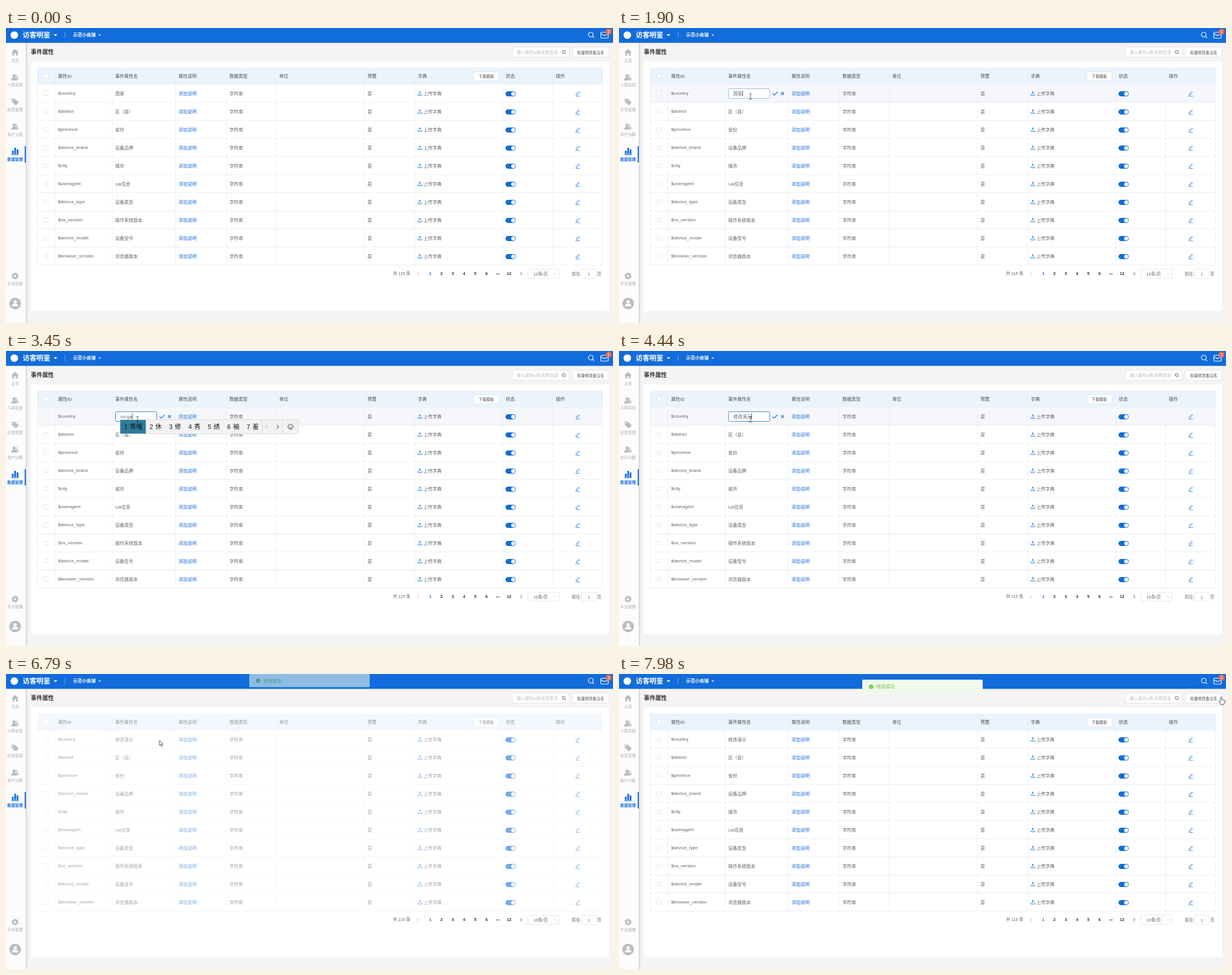
Write an HTML page that moves like this. It is 1073x522 px and loops after 8000 ms.

```html
<!DOCTYPE html>
<html lang="zh-CN">
<head>
<meta charset="utf-8">
<title>事件属性</title>
<style>
html, body { margin: 0; width: 100%; height: 100%; overflow: hidden; background: #f4f4f5; }
svg { display: block; width: 1073px; height: 522px; fill: #606266; cursor: default;
  font: 8px "Liberation Sans", "Noto Sans CJK SC", "Noto Sans CJK", sans-serif; }
.line { fill: none; stroke: currentColor; }
.box { fill: #fff; stroke: #dcdfe6; stroke-width: .8; }
.blue { color: #126cdb; }
.side { filter: drop-shadow(0 0 2px #0005); }
.mid { text-anchor: middle; }
#cursor, #toast, #mask, #field { animation: 8s linear infinite; }
#cursor { animation-name: travel; }
#toast { animation-name: drop; }
#mask { animation-name: refresh; }
#field { animation-name: focus; }

@keyframes travel {
  0%, 1.75% { transform: translate(1008px, 530px); animation-timing-function: ease-in-out; }
  9.5% { transform: translate(1012px, 124px); animation-timing-function: ease-out; }
  11.625%, 12% { transform: translate(1005.5px, 117px); animation-timing-function: ease-in; }
  17% { transform: translate(600px, 138px); animation-timing-function: ease-out; }
  21.75%, 23% { transform: translate(232.5px, 123px); }
  23.75%, 65.25% { transform: translate(232.5px, 121px); animation-timing-function: ease-in-out; }
  75%, 90.625% { transform: translate(271.2px, 117.3px); animation-timing-function: ease-in-out; }
  98% { transform: translate(1067px, 36px); animation-timing-function: ease-out; }
  99.75%, 100% { transform: translate(1064.5px, 40.5px); }
}
@keyframes drop {
  0%, 83.25% { transform: translateY(-24px); opacity: 0; animation-timing-function: ease; }
  88.25%, 100% { transform: none; opacity: 1; }
}
@keyframes refresh {
  0%, 83.25% { opacity: 0; }
  85% { opacity: .45; }
  88.4%, 100% { opacity: 0; }
}
@keyframes focus {
  0%, 23% { stroke: #c0c4cc; }
  25.5%, 78.9% { stroke: #126cdb; }
  80.6%, 100% { stroke: #c0c4cc; }
}
</style>
</head>
<body>
<svg viewBox="0 0 1073 522">
  <defs>
    <g id="people">
      <circle cx="-1.5" cy="-2.6" r="2.9"/><path d="M-7 5.2q0-5 5.5-5t5.5 5z"/>
      <path d="M2-5.2a2.8 2.8 0 0 1 1 5q3.5.6 3.5 4.5h-1.7q-.3-3-3.3-4.6 2.3-2.2.5-4.9z"/>
    </g>
    <g id="lens" class="line"><circle r="1"/><path d="M.72.72 1.4 1.4"/></g>
    <g id="upload" class="line"><path d="M-3.3.8V3.3H3.3V.8M0 1.5V-3.2M-1.9-1.4 0-3.3 1.9-1.4"/></g>
    <g id="pencil" class="line"><path d="M-3.8 4H4M-2.8 2.2l.5-2L2-3.8 3.3-2.5-1 1.7z"/></g>
  </defs>

  <rect width="1073" height="522" fill="#f4f4f5"/>
  <rect x="44" y="59" width="1022" height="442" fill="#fff"/>
  <rect class="side" y="20" width="35" height="510" fill="#fcfcfd"/>
  <rect width="1073" height="26.3" fill="#126cdb"/>

  <g fill="#fff">
    <circle cx="14.7" cy="12.6" r="6.7"/>
    <text x="29.5" y="17" font-size="12.2" font-weight="bold">访客明鉴</text>
    <path d="M84.3 11h6.4l-3.2 3.4zM163.3 11.5h4.6l-2.3 2.4z"/>
    <path d="M104.2 7h.8v11h-.8z" opacity=".5"/>
    <text x="118.5" y="15.3" font-weight="bold">示范小商铺</text>
  </g>
  <g color="#fff" class="line" stroke-width="1.2">
    <use href="#lens" transform="translate(1033.7 11.7) scale(4.2)" stroke-width=".29"/>
    <rect x="1051.5" y="7.5" width="13" height="10.5" rx="1.5"/><path d="M1052 10.5 1058 13.5 1064 10.5"/>
  </g>
  <circle cx="1065.3" cy="6.5" r="5.3" fill="#f26b4e"/>
  <text class="mid" x="1065.3" y="9" font-size="7" fill="#fff">1</text>

  <g fill="#babcc2" stroke="none">
    <path d="M16 37 9.5 43H11.3V49H14.3V45H17.7V49H20.7V43H22.5z"/>
    <use href="#people" x="16" y="87.5"/>
    <path d="M10 125h5.5l7 6.5-5 5.5-7.5-6.5z"/><circle cx="12.8" cy="127.7" r="1.1" fill="#fff"/>
    <use href="#people" x="16" y="174.5"/>
    <circle cx="16" cy="439" r="3.5" fill="none" stroke="#babcc2" stroke-width="3"/>
    <circle cx="16" cy="439" r="5.4" fill="none" stroke="#babcc2" stroke-width="1.8" stroke-dasharray="2.8 2.85"/>
    <circle cx="16.2" cy="487.5" r="10.3"/>
  </g>
  <g fill="#fff"><circle cx="16.2" cy="484.5" r="3"/><path d="M10.5 492.5q0-4.8 5.7-4.8t5.7 4.8z"/></g>
  <path d="M10.5 217h3v6h-3zM14.7 212h3v11h-3zM18.9 215h3v8h-3zM9.5 223.5h13v1.3h-13zM33 209h2v29h-2z" fill="#126cdb"/>
  <g id="menu" class="mid" font-size="6.85" fill="#a8aab0"></g>

  <text x="43.8" y="46.3" font-size="10.2" font-weight="bold" fill="#303133">事件属性</text>
  <rect class="box" x="895" y="34" width="100.5" height="17.5" rx="1.5"/>
  <text x="903" y="45.7" font-size="7.43" fill="#b9bcc4">输入属性id和名称查询</text>
  <use href="#lens" transform="translate(985.8 42.3) scale(2.7)" stroke-width=".35" color="#55585e"/>
  <rect class="box" x="1001.5" y="34" width="64.5" height="17.5" rx="1.5"/>
  <text class="mid" x="1033.5" y="45.5" font-size="6.85" fill="#45484d">批量修改备注名</text>

  <g id="table"></g>
  <g id="pager"></g>

  <g id="editor">
    <rect id="field" class="box" x="193.5" y="107.5" width="73" height="17" rx="2"/>
    <text id="value" x="202" y="119" xml:space="preserve"></text>
    <path id="caret" d="M0 110.5V121" stroke="#222" stroke-width=".8"/>
    <path class="line blue" d="M271.5 116 274.5 119 280 113M286.5 113.5l5 5m0-5-5 5" stroke-width="1.2"/>
  </g>
  <rect id="mask" x="55" y="70" width="1000" height="350" fill="#fff"/>
  <g id="ime" font-size="10.9" fill="#111"></g>

  <g id="toast">
    <rect x="430" y="10" width="213" height="24" rx="2" fill="#f0f9eb"/>
    <circle cx="445.8" cy="22.5" r="3.7" fill="#67c23a"/>
    <path d="M444 22.5l1.3 1.3 2.4-2.5" class="line" color="#fff" stroke-width=".9"/>
    <text x="455" y="25.4" fill="#67c23a">修改成功</text>
  </g>

  <g id="cursor" fill="#fff" stroke="#222" stroke-width=".8" stroke-linejoin="round">
    <path id="arrow" d="M0 0V9.2L2.1 7.3 3.7 10.8 5.2 10.1 3.6 6.8H6.4z"/>
    <path id="hand" d="M-1.1 8.2V.9a1.1 1.1 0 0 1 2.2 0V5l4 .8q1.4.4 1.2 1.8l-.6 3.2-1.2 2.4h-5l-1.4-2.2-2.8-3.2q.8-1.2 2.6.4z"/>
    <path id="beam" fill="none" d="M-2.2-5H-.6L0-4.4.6-5H2.2M0-4.4V4.4M-2.2 5H-.6L0 4.4.6 5H2.2"/>
  </g>
</svg>

<script>
const $ = id => document.getElementById(id);
const text = (x, y, s, attrs = '') => `<text x="${x}" y="${y}" ${attrs}>${s}</text>`;
const path = (d, attrs = '') => `<path class="line" d="${d}" ${attrs}/>`;
const rect = (x, y, w, h, attrs) => `<rect x="${x}" y="${y}" width="${w}" height="${h}" ${attrs}/>`;
const box = (x, y, w, h) => rect(x, y, w, h, 'class="box" rx="1.5"');
const show = (id, on) => $(id).setAttribute('visibility', on ? 'visible' : 'hidden');

const LOOP = 8000, TOP = 100, ROW = 32;
const EDIT_FROM = 960, FOCUS = 1860, BLUR = 6180, EDIT_TO = 6460, RELOAD = 6660, LEAVE = 7250;
const BLINK = 530;

const columns = [55, 86, 187, 299, 389, 477, 633, 722, 877.5, 966, 1055];
const titles = ['', '属性ID', '事件属性名', '属性说明', '数据类型', '单位', '预置', '字典', '状态', '操作'];
const properties = [
  ['$country', '国家'], ['$district', '区（县）'], ['$province', '省份'],
  ['$device_brand', '设备品牌'], ['$city', '城市'], ['$useragent', 'UA信息'],
  ['$device_type', '设备类型'], ['$os_version', '操作系统版本'],
  ['$device_model', '设备型号'], ['$browser_version', '浏览器版本']
];

// Time, field content and, while composing, the offered candidates
const strokes = [
  [0, '国家'], [2510, '国'], [2630, ''],
  [2890, 'x', '下 想 小 需要 学 新 向'],
  [3010, 'xi', '系统 喜欢 希望 西 洗 系 细'],
  [3130, 'xiu', '修 秀 休 袖 绣 羞 朽'],
  [3300, "xiu'g", '修改 秀个 修过 修管 休管 秀股 休'],
  [3430, "xiu'ga", '秀嘎 休 修 秀 绣 袖 羞'],
  [3520, "xiu'gai", '修改 修盖 休 修 秀 绣 袖'],
  [3580, '修改'],
  [3880, '修改y', '一 有 要 也 用 与 于'],
  [3970, '修改ya', '呀 压 亚 牙 雅 鸭 押'],
  [4060, '修改yan', '眼 演 严 烟 言 研 盐'],
  [4150, "修改yan's", '颜色 演示 严肃 演算 掩饰 眼神 言'],
  [4240, "修改yan'sh", '演示 掩饰 眼神 延伸 厌世 研 演'],
  [4330, "修改yan'shi", '演示 掩饰 岩石 厌世 验尸 演 严'],
  [4440, '修改演示']
];

const menuLabels = [[57, '主页'], [100.5, '人群实验'], [144.5, '标签管理'], [188, '用户分群'], [232, '数据管理'], [452.5, '平台管理']];
$('menu').innerHTML = menuLabels.map(([y, s]) =>
  text(16, y + 2.5, s, s === '数据管理' ? 'fill="#126cdb" font-weight="bold"' : '')).join('');

function propertyRow([id, name], i) {
  const y = TOP + i * ROW, base = y + 18.7;
  return rect(55, y, 1000, ROW, 'class="row" fill="#fff"') + box(67, y + 12, 7.6, 7.6)
    + text(92, base - .4, id)
    + text(193, base + .5, name, i ? '' : 'id="name"')
    + text(305, base, '添加说明', 'fill="#126cdb"')
    + text(395, base, '字符串') + text(639, base, '是')
    + `<use href="#upload" x="731.5" y="${y + 15.8}" class="blue" stroke-width=".9"/>`
    + text(738, base, '上传字典')
    + rect(883, y + 12, 18, 9, 'rx="4.5" fill="#126cdb"')
    + `<circle cx="896.5" cy="${y + 16.5}" r="3.5" fill="#fff"/>`
    + `<use href="#pencil" x="1010.5" y="${y + 16.5}" class="blue" stroke-width=".8"/>`
    + path(`M55 ${y + ROW - .5}H1055`, 'color="#ebeef5"');
}

$('table').innerHTML = rect(55, 70, 1000, 30, 'fill="#ebf3fd"') + box(67, 81, 7.6, 7.6)
  + titles.map((s, i) => text(columns[i] + 6, 87.8, s, 'fill="#4a4d52"')).join('')
  + box(827, 77.5, 44.5, 16) + text(849, 88, '下载模板', 'class="mid" font-size="6.85" fill="#45484d"')
  + properties.map(propertyRow).join('')
  + columns.map(x => path(`M${x + (x === 1055 ? -.5 : .5)} 70V420`, 'color="#e8ecf3" stroke-width=".8"')).join('');

const pages = ['1', '2', '3', '4', '5', '6', '•••', '12'];
const small = 'font-size="7.43"';
$('pager').innerHTML = text(684, 437.3, '共 115 条', small)
  + pages.map((s, i) => text(750 + i * 19.9, 437.3, s,
    `class="mid" font-weight="bold" font-size="${s === '•••' ? 6 : 7.43}" fill="${i ? '#303133' : '#126cdb'}"`)).join('')
  + path('M729.5 432 727 434.7 729.5 437.4', 'color="#b4b7bd"')
  + path('M909.5 432 912 434.7 909.5 437.4', 'color="#45484d"')
  + box(922.5, 427, 55.5, 16) + text(945, 437.5, '10条/页', `class="mid" ${small}`)
  + path('M968.5 434 970.5 436 972.5 434', 'color="#c0c4cc" stroke-width=".8"')
  + text(1000, 437.5, '前往', small) + box(1017.5, 427, 25.5, 16)
  + text(1030, 437.5, '1', `class="mid" ${small}`) + text(1045, 437.5, '页', small);

function candidateBar(left, words) {
  const width = w => 23.4 + 10.9 * w.length;
  let x = left, items = '';
  words.forEach((w, i) => {
    if (!i) items += rect(x, 122, width(w), 24, 'fill="#2d7d9a"');
    items += text(x + 6.7, 137.8, i + 1) + text(x + 17, 137.8, w);
    x += width(w);
  });
  return rect(left, 121.5, x + 64 - left, 25, 'fill="#f2f2f2" stroke="#d4d4d4" stroke-width=".8"') + items
    + path(`M${x} 122v24M${x + 35.5} 122v24`, 'color="#d4d4d4" stroke-width=".8"')
    + path(`M${x + 9} 130.5l-3 3.5 3 3.5`, 'color="#aaa"')
    + path(`M${x + 26} 130.5l3 3.5-3 3.5`, 'color="#222"')
    + path(`M${x + 45.5} 134a4.5 4.5 0 1 1 9 0a4.5 4.5 0 1 1-9 0M${x + 47.7} 135.2q2.3 2.6 4.6 0M${x + 48.2} 132v1M${x + 51.8} 132v1`, 'color="#222" stroke-width=".9"');
}

const rows = [...document.querySelectorAll('.row')];
let start, current;

function setStroke(stroke) {
  const [, value, words] = stroke;
  $('value').textContent = value;
  const end = 202 + (value ? $('value').getComputedTextLength() : 0) + .5;
  $('caret').setAttribute('transform', `translate(${end} 0)`);
  $('ime').innerHTML = words ? candidateBar(value.startsWith('修改') ? 218 : 202, words.split(' ')) : '';
  current = stroke;
}

function pointerShape(x, y, editing) {
  const within = (l, t, r, b) => x >= l && x <= r && y >= t && y <= b;
  if (editing && within(193, 107, 267, 125)) return 'beam';
  const onLink = within(1003, 110, 1016, 122) || within(1001, 34, 1070, 52);
  return onLink || (editing && within(269, 110, 294, 122)) ? 'hand' : 'arrow';
}

function draw(now) {
  start ??= now;
  const t = (now - start) % LOOP;
  const editing = t >= EDIT_FROM && t < EDIT_TO;
  const stroke = strokes.findLast(s => s[0] <= t);
  if (stroke !== current) setStroke(stroke);

  show('editor', editing);
  show('name', !editing);
  $('name').textContent = t < EDIT_TO ? '国家' : '修改演示';
  const focused = t >= FOCUS && t < BLUR;
  const lit = Math.floor((t - Math.max(stroke[0], FOCUS)) / BLINK) % 2 === 0;
  $('caret').setAttribute('visibility', focused && lit ? 'inherit' : 'hidden');

  const { e: x, f: y } = new DOMMatrix(getComputedStyle($('cursor')).transform);
  const shape = pointerShape(x, y, editing);
  for (const id of ['arrow', 'hand', 'beam']) show(id, id === shape);
  const hovered = t >= RELOAD && t < LEAVE ? -1 : Math.floor((y - TOP) / ROW);
  rows.forEach((row, i) => row.setAttribute('fill', i === hovered ? '#f5f7fa' : '#fff'));
  requestAnimationFrame(draw);
}
requestAnimationFrame(draw);
</script>
</body>
</html>
```
